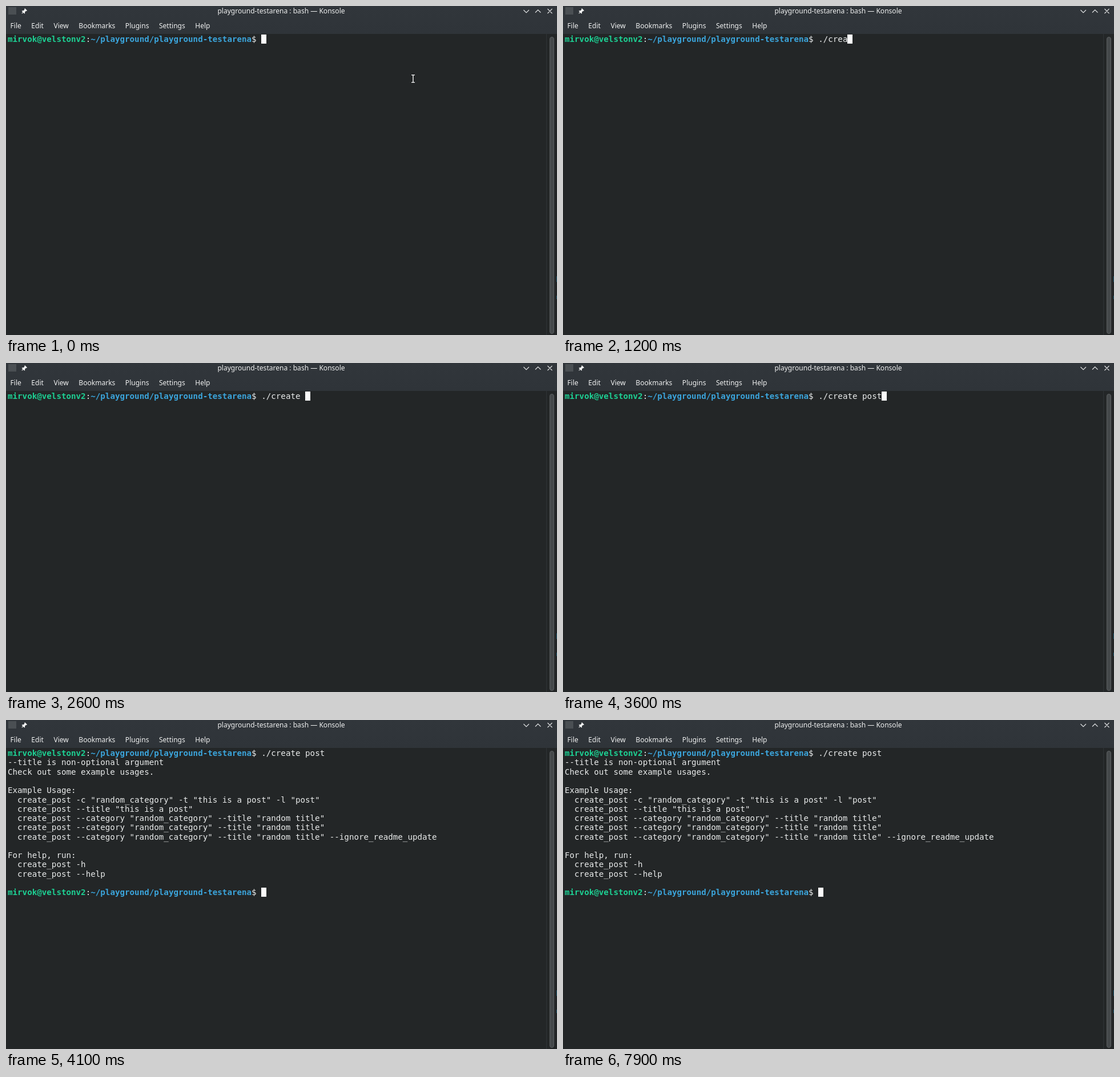
Animation of 965 by 577 pixels, one loop 8000 ms. Source, as an HTML page:

```html
<!DOCTYPE html>
<html lang="en">
<head>
<meta charset="utf-8">
<title>Terminal session</title>
<style>
  html, body { margin: 0; width: 100%; height: 100%; overflow: hidden; background: #232627; }
  #stage { position: relative; width: 965px; height: 577px; overflow: hidden; background: #232627; }

  header {
    position: absolute; inset: 0 0 auto; height: 49px;
    background: linear-gradient(#31363b, #2f3439);
    color: #f0f1f1; font: 12.05px/16px "Noto Sans", sans-serif; white-space: pre;
  }
  .title { position: absolute; top: 1px; left: 0; width: 964px; text-align: center; }
  nav { position: absolute; top: 27px; left: 7.6px; display: flex; gap: 17.5px; }
  svg { position: absolute; inset: 0; fill: none; }

  .track { position: absolute; left: 946px; top: 49px; bottom: 0; width: 1px; background: #303436; }
  .thumb {
    position: absolute; left: 952px; top: 54px; width: 6px; height: 519px;
    border: 1px solid #5a5e60; border-radius: 4px; background: #45494b;
  }
  .sliver { position: absolute; left: 964px; width: 1px; background: #1f5a72; }

  pre {
    --row: 16.27px;
    position: absolute; left: 3px; top: 50.2px; margin: 0;
    color: #e9ebeb; font: 14.2px/var(--row) "DejaVu Sans Mono", monospace;
    font-variant-ligatures: none;
  }
  pre b { color: #1dd093; }
  pre b + b { color: #3ba5dc; }
  .typed, .cursor { display: inline-block; vertical-align: top; height: var(--row); }
  .typed { overflow: hidden; width: 0; animation: type 8s step-end infinite; }
  .cursor { width: 1ch; background: #fcfcfc; }
  .until-run { animation: until-run 8s step-end infinite; }
  .output { visibility: hidden; animation: after-run 8s step-end infinite; }
  .pointer { animation: pointer 8s step-end infinite; }

  /* one percent is 80 ms */
  @keyframes type {
    0% { width: 0; }
    7.5% { width: 1ch; }
    10% { width: 2ch; }
    11.25% { width: 3ch; }
    12.5% { width: 4ch; }
    13.75% { width: 5ch; }
    15% { width: 6ch; }
    16.25% { width: 7ch; }
    18.75% { width: 8ch; }
    30% { width: 9ch; }
    35% { width: 10ch; }
    36.25% { width: 12ch; }
    38.75%, 100% { width: 13ch; }
  }
  @keyframes until-run { 0% { visibility: visible; } 48.75%, 100% { visibility: hidden; } }
  @keyframes after-run { 0% { visibility: hidden; } 48.75%, 100% { visibility: visible; } }
  @keyframes pointer { 0% { visibility: visible; } 7.5%, 100% { visibility: hidden; } }
</style>
</head>
<body>
<div id="stage">
  <header>
    <div class="title">playground-testarena : bash — Konsole</div>
    <nav><span>File</span><span>Edit</span><span>View</span><span>Bookmarks</span><span>Plugins</span><span>Settings</span><span>Help</span></nav>
  </header>

  <pre><b>mirvok@velstonv2</b>:<b>~/playground/playground-testarena</b>$ <span class="typed">./create_post</span><span class="cursor until-run"></span>
<span class="output">--title is non-optional argument
Check out some example usages.

Example Usage:
  create_post -c "random_category" -t "this is a post" -l "post"
  create_post --title "this is a post"
  create_post --category "random_category" --title "random title"
  create_post --category "random_category" --title "random title"
  create_post --category "random_category" --title "random title" --ignore_readme_update

For help, run:
  create_post -h
  create_post --help

<b>mirvok@velstonv2</b>:<b>~/playground/playground-testarena</b>$ <span class="cursor"></span></span></pre>

  <div class="track"></div>
  <div class="thumb"></div>
  <div class="sliver" style="top:474px;height:10px"></div>
  <div class="sliver" style="top:508px;height:6px"></div>

  <svg width="965" height="577">
    <rect x="4" y="2" width="14" height="13" fill="#4a4f53"/>
    <!-- pin -->
    <path d="M33 4l4 4-1 1-1-.3-2 2 .2 2-1 .8-4.500-4.500 .8-1 2 .2 2-2-.3-1z" fill="#f4f5f5"/>
    <path d="M31 10l-3.200 3.200" stroke="#f4f5f5" stroke-width="1.100"/>
    <!-- window buttons -->
    <path d="M906.500 7l4.700 4.700L916 7M927 11.500l4.700-4.700 4.800 4.700M948.500 5l8 8m0-8l-8 8" stroke="#e3e5e6" stroke-width="1.100"/>
    <!-- text pointer -->
    <g class="pointer">
      <path id="beam" d="M710 121h6M713 121v13M710 134h6" stroke="#111314" stroke-width="3.400"/>
      <path d="M710 121h6M713 121v13M710 134h6" stroke="#e6e8e8" stroke-width="1.600"/>
    </g>
  </svg>
</div>
</body>
</html>
```
